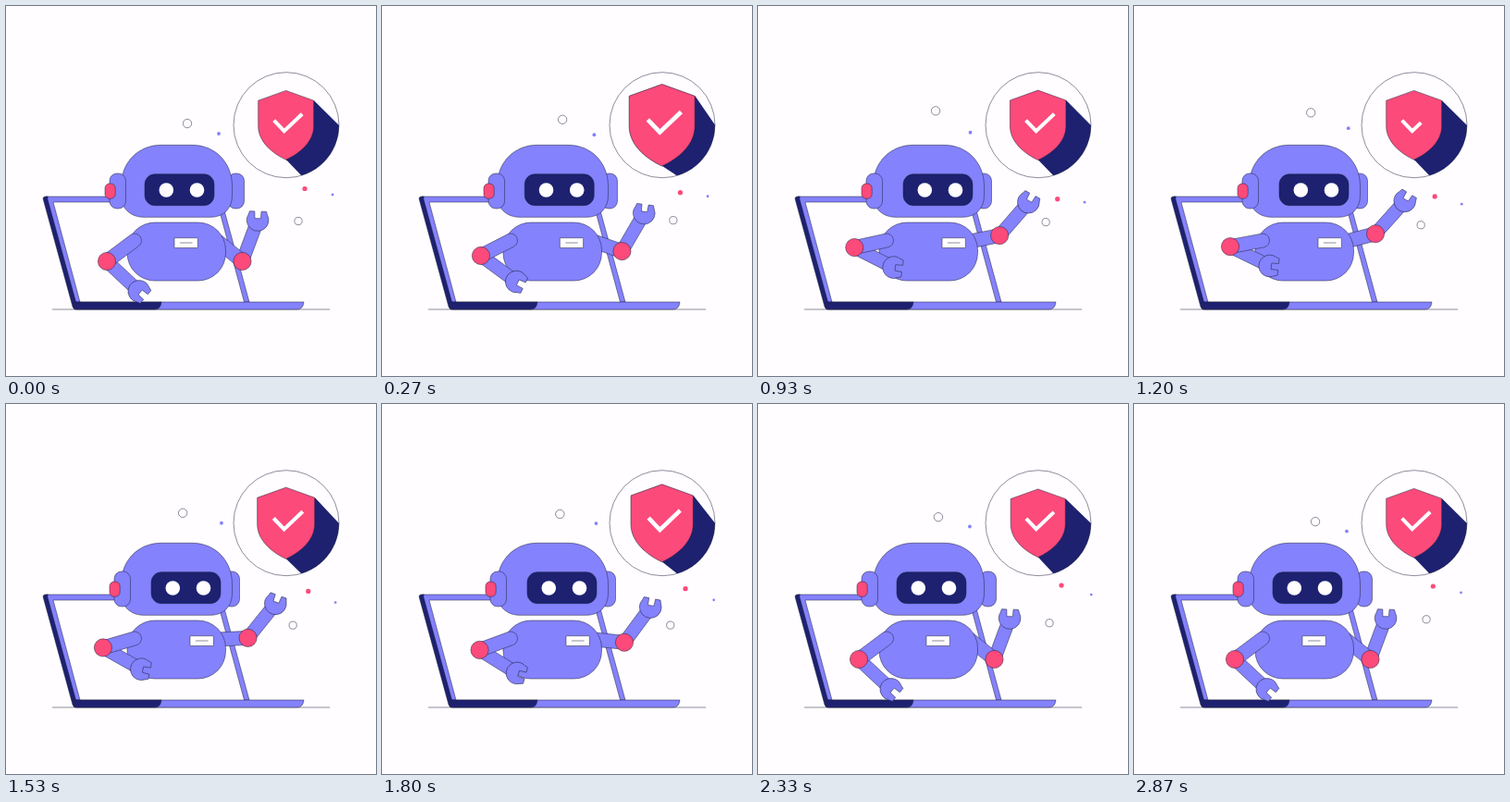
Animation, 400 px wide and 400 px high, one loop 2.94 s. Source, as an HTML page with a canvas:

```html
<!DOCTYPE html>
<html lang="en">
<head>
<meta charset="utf-8">
<title>Robot guard</title>
<style>
html, body { margin: 0; width: 100%; height: 100%; overflow: hidden; background: #fffdff; }
canvas { display: block; width: 100vw; height: 100vh; }
</style>
</head>
<body>
<canvas id="stage"></canvas>
<script>
const LOOP = 2940, STEPS = 44, HALF = STEPS / 2;
const PAPER = '#fffdff', VIOLET = '#8482fc', NAVY = '#1d2170', PINK = '#fc4a7a';
const LINE = 'rgba(32, 32, 62, 0.85)', THIN = 0.6;
const canvas = document.getElementById('stage');
const ctx = canvas.getContext('2d');
const ratio = window.devicePixelRatio || 1;
canvas.width = canvas.height = 400 * ratio;

const mix = (a, b, u) => a + (b - a) * u;
const clamp = u => Math.min(1, Math.max(0, u));
const rad = deg => deg * Math.PI / 180;

function ease(t, from, to) {
  const u = clamp((t - from) / (to - from));
  return u * u * (3 - 2 * u);
}

// Motion: the robot turns and returns, raising its arms in between.
const turn = f => ease(f, 0, 7) - ease(f, 28.5, 35);
const raise = f => Math.sin(Math.PI * clamp((f - 6) / 22)) ** 2;
const blink = f => clamp(1 - Math.abs(f - 30) / 2);

// The shield springs up and rings out once per half loop.
function spring(g) {
  const ring = Math.exp((3.5 - g) / 7) * Math.sin(Math.PI * g / 6.8);
  return 1 + 0.205 * ring * ease(g, 0, 3) * (1 - ease(g, 15, 18));
}

// Arm poses: elbow, forearm angle, hand angle.
const LEFT = {
  shoulder: [139, 253.5],
  rest: [109, 276, 43, 40], held: [105.6, 266, 32, 16], high: [104, 260, 26, 6]
};
const RIGHT = {
  shoulder: [229, 254.5],
  rest: [255.5, 276, -69.5, -88], held: [262, 258, -53.5, -79], high: [261, 246, -48, -58]
};

function pose(arm, f) {
  const k = turn(f), r = raise(f);
  return arm.rest.map((v, i) => mix(v, mix(arm.held[i], arm.high[i], r), k));
}

// Each dot drifts round a closed path, a quarter loop per point.
const dots = [
  { r: 4.7, path: [[196, 127], [192.8, 113.5], [191, 117.5], [194.5, 121]] },
  { r: 1.9, fill: VIOLET, path: [[230, 138], [228.5, 139], [233, 129], [229, 131.5]] },
  { r: 2.6, fill: PINK, path: [[323, 197.5], [323, 209], [326.5, 203], [328.7, 196.5]] },
  { r: 1.4, fill: VIOLET, path: [[353, 204], [352.5, 210.5], [355.7, 214.8], [361, 207]] },
  { r: 4.1, path: [[316, 232.5], [312, 232], [310, 239], [314.5, 237.5]] }
];

function along(path, u) {
  const n = path.length, i = Math.floor(u * n), t = u * n - i;
  const [a, b, c, d] = [-1, 0, 1, 2].map(k => path[(i + k + n) % n]);
  return [0, 1].map(j => b[j] + 0.5 * t * (c[j] - a[j] +
    t * (2 * a[j] - 5 * b[j] + 4 * c[j] - d[j] + t * (3 * (b[j] - c[j]) + d[j] - a[j]))));
}

function paint(fill, stroke = LINE, width = THIN) {
  if (fill) { ctx.fillStyle = fill; ctx.fill(); }
  if (stroke) { ctx.strokeStyle = stroke; ctx.lineWidth = width; ctx.stroke(); }
}

function shape(d, fill) {
  const p = new Path2D(d);
  if (fill) { ctx.fillStyle = fill; ctx.fill(p); }
  ctx.strokeStyle = LINE;
  ctx.lineWidth = THIN;
  ctx.stroke(p);
}

function circle(x, y, r, fill, stroke) {
  ctx.beginPath();
  ctx.arc(x, y, r, 0, Math.PI * 2);
  paint(fill, stroke);
}

function box(x, y, w, h, r, fill) {
  ctx.beginPath();
  ctx.roundRect(x, y, w, h, r);
  paint(fill);
}

function limb(x1, y1, x2, y2, width) {
  const a = Math.atan2(y2 - y1, x2 - x1), q = Math.PI / 2, r = width / 2;
  ctx.beginPath();
  ctx.arc(x1, y1, r, a + q, a - q);
  ctx.arc(x2, y2, r, a - q, a + q);
  ctx.closePath();
  paint(VIOLET);
}

function claw(x, y, angle) {
  ctx.save();
  ctx.translate(x, y);
  ctx.rotate(angle);
  ctx.beginPath();
  ctx.arc(0, 0, 11.8, rad(60), rad(-60));
  ctx.lineTo(9.5, -9);
  ctx.lineTo(9.5, -3.6);
  ctx.lineTo(1.8, -3.2);
  ctx.lineTo(1.8, 3.2);
  ctx.lineTo(9.5, 3.6);
  ctx.lineTo(9.5, 9);
  ctx.closePath();
  paint(VIOLET);
  ctx.restore();
}

function forearm([x, y, angle, hand]) {
  const c = Math.cos(rad(angle)), s = Math.sin(rad(angle));
  limb(x, y, x + c * 40, y + s * 40, 14);
  claw(x + c * 47.5, y + s * 47.5, rad(hand));
}

function upperArm([sx, sy], [x, y]) {
  limb(sx, sy, x, y, 15);
  circle(x, y, 9.6, PINK);
}

function laptop() {
  shape('M50 328H350');
  shape('M43 206H228Q232 206 233 210L263 320H257.5L229 215Q228 212 225 212H51L80 320H75Z', VIOLET);
  shape('M45.500 206H43Q39 206 40.500 210L72 325Q73 328 76 328L75.500 320L45 209Q44.500 207 45.500 206Z', NAVY);
  shape('M76 320H322Q321 328 315 328H76Z', VIOLET);
  shape('M75 320H168Q167 328 161 328H75Q73 328 73 325Z', NAVY);
}

function eye(x, b) {
  const y = 199 + 2 * b;
  ctx.beginPath();
  ctx.ellipse(x, y, 7.8, 7.8 - 1.3 * b, 0, Math.PI, 0);
  ctx.ellipse(x, y, 7.8, 7.8 - 4.6 * b, 0, 0, Math.PI);
  paint(PAPER, null);
}

function robot(f) {
  const k = turn(f), face = 7 * k, ear = 5 * k;
  const left = pose(LEFT, f), right = pose(RIGHT, f);

  forearm(right);
  upperArm(RIGHT.shoulder, right);

  box(131, 234, 106.5, 63, 30, VIOLET);
  const badge = 182 + 17 * k;
  box(badge, 250.7, 25.3, 10.8, 0.5, PAPER);
  ctx.beginPath();
  ctx.moveTo(badge + 6, 256);
  ctx.lineTo(badge + 19.5, 256);
  paint(null);

  forearm(left);
  upperArm(LEFT.shoulder, left);

  box(240 - ear, 181, 17.5, 38, 8, VIOLET);
  shape('M124.400 195C124.400 169 143 150.300 168 150.300H201C226 150.300 244.500 169 244.500 195V205C244.500 219 235 228.300 221 228.300H149C135 228.300 124.400 219 124.400 205Z', VIOLET);
  box(112 + ear, 181, 17.5, 38, 8, VIOLET);
  box(107 + ear, 192, 11.2, 16.3, 5, PINK);
  box(150 + face, 181.7, 75, 34, 11, NAVY);
  for (const x of [173.3, 206.5]) eye(x + face, blink(f));
}

function tick(progress) {
  const d = progress * 43, a = clamp(d / 16), b = clamp((d - 16) / 27);
  ctx.beginPath();
  ctx.moveTo(-13, -5);
  ctx.lineTo(mix(-13, -2, a), mix(-5, 6.5, a));
  if (b > 0) ctx.lineTo(mix(-2, 17.5, b), mix(6.5, -12, b));
  paint(null, PAPER, 4);
}

function shield(f) {
  const g = f % HALF, s = spring(g), cx = 303, cy = 128.7;
  circle(cx, cy, 57, PAPER, null);
  ctx.save();
  ctx.clip();

  // Shadow: from the shield's corner and tip to fixed places on the rim.
  ctx.beginPath();
  ctx.moveTo(cx, cy);
  ctx.lineTo(cx + 30 * s, cy - 26.5 * s);
  ctx.lineTo(361, 130);
  ctx.lineTo(361, 200);
  ctx.lineTo(320.5, 184.5);
  ctx.lineTo(cx, cy + 37.5 * s);
  paint(NAVY, null);

  ctx.translate(302.7, cy);
  ctx.scale(s, s);
  shape('M0 -37.300L30 -26.500V1C30 18 15 30.500 0 37.500C-15 30.500 -30 18 -30 1V-26.500Z', PINK);
  const drawn = g < 15.7 ? 1 : 1 - (1 - clamp((g - 15.7) / 5.3)) ** 2;
  tick(drawn);
  ctx.restore();
  circle(cx, cy, 57, null);
}

function draw(f) {
  ctx.setTransform(ratio, 0, 0, ratio, 0, 0);
  ctx.fillStyle = PAPER;
  ctx.fillRect(0, 0, 400, 400);
  laptop();
  robot(f);
  shield(f);
  for (const { r, fill, path } of dots) {
    const [x, y] = along(path, f / STEPS);
    circle(x, y, r, fill || PAPER, fill ? null : LINE);
  }
}

let start = null;
function play(now) {
  if (start === null) start = now;
  const t = (now - start) % LOOP;
  draw(Math.floor((t + 8) * 15 / 1000) % STEPS);
  requestAnimationFrame(play);
}
draw(0);
requestAnimationFrame(play);
</script>
</body>
</html>
```
